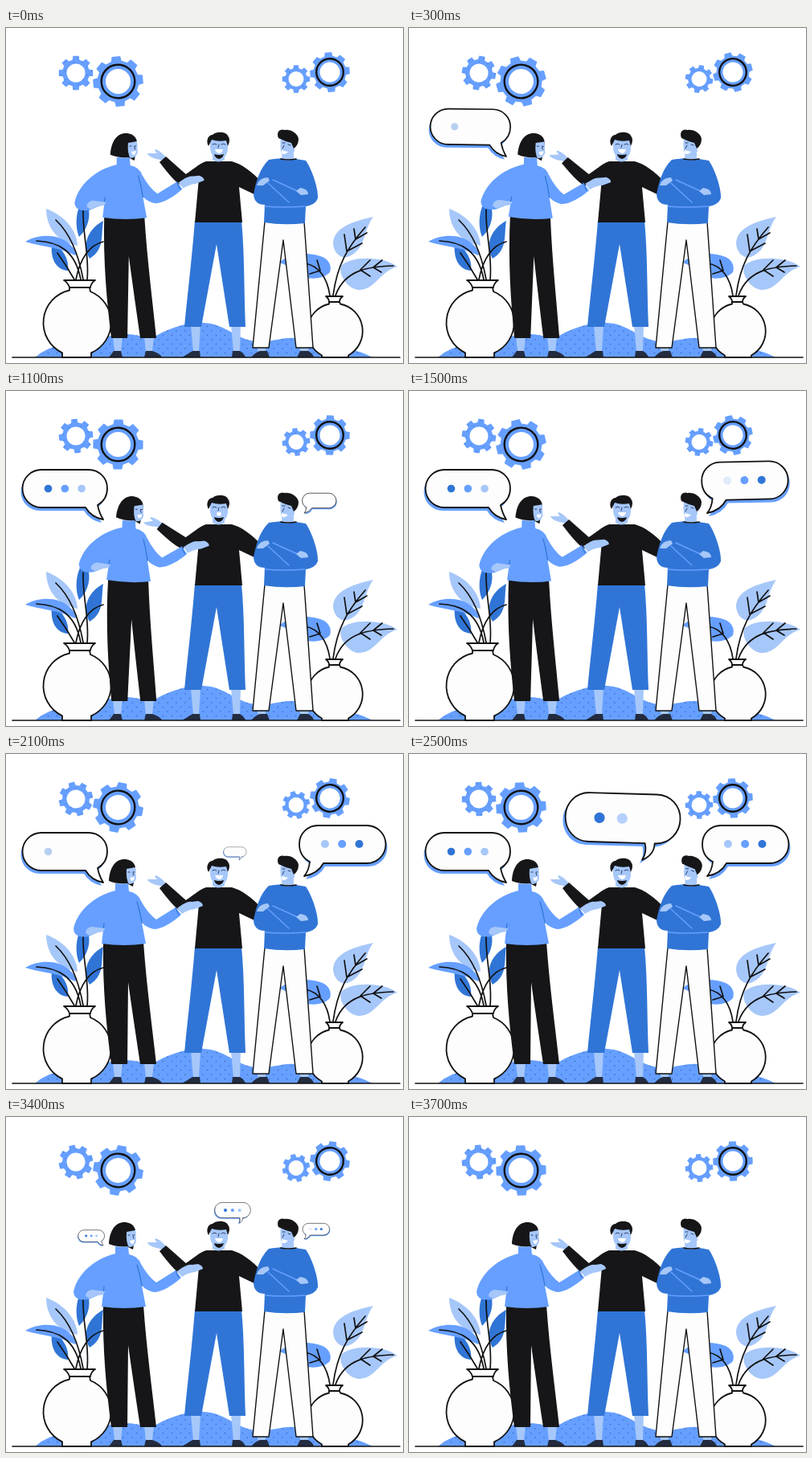
An HTML page for the animation above (3800 ms loop, 494 by 417 pixels).

```html
<!DOCTYPE html>
<html lang="en">
<head>
<meta charset="utf-8">
<title>Team talk</title>
<style>
html, body { margin: 0; width: 100%; height: 100%; overflow: hidden; background: #fff; }
svg { display: block; width: 100%; height: 100%; }
.mid { fill: #669fff; }
.deep { fill: #3075d6; }
.pale { fill: #a6c7f9; }
.ink { fill: #161618; }
.shoe { fill: #232c40; }
.white { fill: #fdfdfd; }
.line { fill: none; stroke: #111; stroke-width: 1.7; stroke-linecap: round; stroke-linejoin: round; }
.seam { fill: none; stroke: #3075d6; stroke-width: 1.2; stroke-linecap: round; }
.fold { fill: none; stroke: #669fff; stroke-width: 1.4; stroke-linecap: round; }
.edge { stroke: #111; stroke-width: 1.8; stroke-linejoin: round; }
.face { fill: none; stroke: #22345a; stroke-width: .9; stroke-linecap: round; }
</style>
</head>
<body>
<svg id="stage" viewBox="0 0 494 417" preserveAspectRatio="none">
  <defs>
    <pattern id="grain" width="11" height="11" patternUnits="userSpaceOnUse">
      <circle cx="3" cy="3" r=".75" fill="#2f62b5"/><circle cx="8.5" cy="8.5" r=".75" fill="#2f62b5"/>
    </pattern>
    <path id="hill" d="M36 410Q52 396 75 394C105 392 125 382 145 381C165 380 172 388 187 383C210 370 232 366 246 367C275 368 288 391 320 391C340 388 355 382 372 389C395 398 430 395 456 410Z"/>
  </defs>

  <use href="#hill" class="mid"/><use href="#hill" fill="url(#grain)"/>
  <g id="gears"></g>

  <!-- left plant -->
  <path class="pale" d="M50 225C50 244 60 266 89 271C88 251 72 233 50 225Z"/>
  <path class="deep" d="M57 269C70 272 79 288 77 302C62 301 55 287 57 269Z"/>
  <path class="mid" d="M24 266C42 255 66 257 78 268C86 275 89 281 86 283C64 272 46 273 24 266Z"/>
  <path class="deep" d="M97 212C107 224 106 246 91 260C85 246 87 224 97 212ZM121 240C118 258 123 276 104 287C94 270 102 250 121 240Z"/>
  <path class="line" d="M38 265C64 266 86 276 93 313M62 239C78 254 90 280 96 313M96 226C95 256 104 284 101 313M121 266C104 270 92 287 87 313M64 280Q76 297 85 313"/>
  <path class="white edge" d="M79 326.5A41.5 41.5 0 0 0 70 404.4V410H106V404.4A41.5 41.5 0 0 0 105 328L104 323H79Z"/>
  <path class="white edge" d="M72 314H111Q106 317 105 323H79Q77 317 72 314Z"/>

  <!-- right plant -->
  <path class="pale" d="M457 235C435 240 408 247 407 268C408 282 418 287 425 285C448 277 444 252 457 235Z"/>
  <path class="pale" d="M487 297C470 284 430 283 417 296C413 306 425 326 440 326C460 325 465 303 487 297Z"/>
  <path class="mid" d="M340 292C352 280 376 278 394 285C404 290 405 298 403 304C394 314 372 314 360 305C354 299 348 294 340 292Z"/>
  <path class="line" d="M447 248C425 273 412 295 407 333M421 257L424 278L443 268M433 250L435 263L449 255M482 296C455 297 422 299 410 333M453 289L441 301L453 309M468 289L457 298L467 304M372 293C390 296 400 312 403 333M387 289L391 302L378 306"/>
  <path class="white edge" d="M402 343.5A34.5 34.5 0 0 0 393 407.5V410H426V407.5A34.5 34.5 0 0 0 416 343.5L415 341H402Z"/>
  <path class="white edge" d="M398 334H419Q415 337 415 341H402Q402 337 398 334Z"/>

  <!-- middle man -->
  <g>
    <path class="pale" d="M230 370H242L240 403H233ZM280 370H292L291 403H283Z"/>
    <path class="shoe" d="M219 410Q226 406 232 402H241L242 410ZM282 402H291Q297 406 298 410H281Z"/>
    <path class="deep" d="M235 240H293C297 280 296 330 298 372H278L262 269L243 372H222C226 330 231 290 235 240Z"/>
    <g id="forearm">
      <path class="pale" d="M199 161C195 156 190 152 186 151Q184 152 188 156L176 156C177 160 185 163 192 164L196 167Z"/>
      <path class="ink" d="M191 167L199 160L225 183L219 196Q212 195 191 167Z"/>
    </g>
    <path class="ink" d="M249 166C240 169 232 177 222 183Q210 192 219 196C228 194 234 190 240 187L235 242H294L290 198L311 208L318 192C306 178 292 169 281 166Z"/>
    <path class="pale" d="M257 155H272V164Q264 169 257 164Z"/>
    <path class="pale" d="M254 139H276V151Q275 162 265 163Q255 161 254 150Z"/>
    <path class="ink" d="M252 147C248 140 252 133 257 133C262 128 274 129 276 134Q280 139 276 147L274 140Q264 142 256 139ZM259 157Q265 159 271 157Q270 162 265 163Q260 162 259 157Z"/>
    <path class="face" d="M257 145Q260 143 262 145M268 145Q271 143 273 145M265 145L264 149"/>
    <path id="smile" fill="#fff" d="M260 151H270Q269 156 265 156Q261 155 260 151Z"/>
    <ellipse id="talk" cx="265" cy="153" rx="2.8" ry="2.5" fill="#fff"/>
  </g>

  <!-- right man -->
  <g>
    <path class="pale" d="M312 395H324L322 404H314ZM364 395H377L376 404H367Z"/>
    <path class="shoe" d="M305 410Q310 404 316 402H325L328 410ZM362 410L366 402H376Q382 405 383 410Z"/>
    <path class="white" stroke="#111" stroke-width="1.4" stroke-linejoin="round" d="M322 241H371L382 398H361L345 264L327 398H307Z"/>
    <path class="deep" d="M327 164C342 161 360 162 373 165C382 178 389 202 388 212Q385 220 373 222L372 243Q345 246 321 242L322 220Q309 220 308 207C311 190 317 173 327 164Z"/>
    <path class="fold" d="M322 222Q345 224 372 222M326 193L352 217M332 189L365 204"/>
    <path class="pale" d="M312 196Q315 186 326 186L328 190L320 196ZM361 203L366 199Q376 200 376 207L367 208Z"/>
    <g id="head">
      <path class="pale" d="M344 152L358 156V163Q350 167 343 163Z"/>
      <path class="pale" d="M342 137L358 141L359 153Q355 163 346 161Q340 156 342 137Z"/>
      <path class="ink" d="M339 137C336 129 341 125 347 127C354 126 363 131 364 138Q364 146 358 150L355 143Q347 141 339 137Z"/>
      <path class="face" d="M344 143L347 143M351 145L354 146M346 146L344 150"/>
      <path fill="#fff" d="M343 152L351 154Q347 159 343 156Z"/>
    </g>
    <path class="line" d="M342 163Q351 165 361 163"/>
  </g>

  <!-- woman -->
  <path class="pale" d="M133 384H145L143 403H135ZM172 384H184L182 403H174Z"/>
  <path class="shoe" d="M128 410L134 402H143L145 410ZM172 410L174 402H182Q192 405 194 410Z"/>
  <path id="legs" class="ink" d="M121 234H171C175 290 182 340 187 386H167Q157 320 152 284L151 386H131C125 340 120 290 121 234Z"/>
  <g id="torso">
    <path class="pale" d="M213 192C220 187 226 183 231 184L239 183Q245 185 245 189L235 193Q226 194 219 199Z"/>
    <path class="pale" d="M138 153H152V168H138Z"/>
    <path class="ink" d="M128 158C129 140 137 130 149 131Q163 133 161 148L158 165L150 161Q138 162 128 158Z"/>
    <path class="pale" d="M150 143L161 141L162 155Q160 162 153 162Q149 156 150 143Z"/>
    <path class="face" d="M152 147H154M158 147H160M158 148L159 151"/>
    <path fill="#fff" d="M154 154L160 153Q160 158 156 158Z"/>
    <path class="mid" d="M136 161Q144 163 152 161L153 171Q164 173 168 183Q177 199 187 206L211 191L218 200C207 210 194 218 184 218Q175 216 169 210L174 236Q147 240 119 236L121 219L103 227Q85 230 84 218C88 197 108 177 136 170Z"/>
    <path class="seam" d="M163 184Q167 197 169 210M122 211L121 219M211 191L215 200"/>
    <path class="pale" d="M99 223Q99 217 106 215L123 217Q123 222 114 222L104 226Z"/>
  </g>

  <path class="line" stroke-width="2" d="M8 410H490"/>
  <g id="bubbles"></g>
</svg>
<script>
const LOOP = 3800, STEP = 100;
const $ = id => document.getElementById(id);
const clamp = x => Math.min(1, Math.max(0, x));
const ramp = (t, from, span) => clamp((t - from) / span);
const smooth = x => x * x * (3 - 2 * x);

function add(parent, tag, attrs) {
  const el = document.createElementNS('http://www.w3.org/2000/svg', tag);
  for (const key in attrs) el.setAttribute(key, attrs[key]);
  return parent.appendChild(el);
}

const circle = r => `M${r} 0A${r} ${r} 0 1 1 ${-r} 0A${r} ${r} 0 1 1 ${r} 0Z`;

function gearPath(outer, root, hole) {
  const points = [];
  for (let i = 0; i < 8; i++) {
    for (const [r, a] of [[root, -.25], [outer, -.17], [outer, .17], [root, .25]]) {
      const angle = i * Math.PI / 4 + a;
      points.push((r * Math.cos(angle)).toFixed(2) + ' ' + (r * Math.sin(angle)).toFixed(2));
    }
  }
  return 'M' + points.join('L') + 'Z' + circle(hole);
}

// meshing pairs turn in opposite directions
const gears = [
  { x: 87, y: 56, outer: 21.5, root: 17, hole: 11.5, dir: 1, start: 0 },
  { x: 139.5, y: 66.5, outer: 31.5, root: 26, hole: 15.5, ring: 20.8, dir: -1, start: -5 },
  { x: 361, y: 63.5, outer: 17.5, root: 13.8, hole: 9.5, dir: 1, start: 0 },
  { x: 403, y: 55, outer: 25, root: 20.5, hole: 12.5, ring: 16.8, dir: -1, start: -5 }
];
for (const g of gears) {
  g.el = add($('gears'), 'g', {});
  const d = gearPath(g.outer, g.root, g.hole);
  add(g.el, 'path', { d, class: 'mid', 'fill-rule': 'evenodd' });
  if (g.ring) add(g.el, 'circle', { r: g.ring, fill: 'none', stroke: '#111', 'stroke-width': 2.4 });
  else add(g.el, 'path', { d, fill: 'url(#grain)', 'fill-rule': 'evenodd', opacity: .6 });
}

// dots: [first x, spacing, y, radius]; fades: [time, appearing]
const bubbles = [
  { d: 'M44 98H103A23 23 0 0 1 126 121C126 131 121 138 114 142Q116 152 121 160Q106 157 99 145H44A23.5 23.5 0 0 1 44 98Z',
    tip: [121, 160], shade: [-2, 4], dots: [52.5, 20.8, 121.5, 4.8], start: 0, tilt: 1.2,
    fades: [[250, 1], [1500, 0], [2050, 1]] },
  { d: 'M388 89H449A23.5 23.5 0 0 1 449 136H395Q388 149 371 152Q377 145 378 134C370 130 365 122 365 112A23 23 0 0 1 388 89Z',
    tip: [371, 152], shade: [2, 4], dots: [439.5, -21.3, 112, 5], start: 950, tilt: -1.4,
    fades: [[1150, 1], [2600, 0], [3050, 1]] },
  { d: 'M223 50H306C324 50 336 64 336 80C336 96 324 111 306 111H305Q305 125 290 132Q296 122 293 111H223C205 111 193 97 193 80C193 64 205 50 223 50Z',
    tip: [290, 132], shade: [-3, 4], dots: [235.5, 28.3, 81, 6.6], start: 2000, tilt: 1.8,
    fades: [[2280, 1]] }
];
for (const b of bubbles) {
  b.el = add($('bubbles'), 'g', {});
  add(b.el, 'path', { d: b.d, class: 'mid', transform: `translate(${b.shade})` });
  add(b.el, 'path', { d: b.d, class: 'white edge' });
  const [x, gap, cy, r] = b.dots;
  b.spots = ['deep', 'mid', 'pale'].map((c, i) => add(b.el, 'circle', { cx: x + gap * i, cy, r, class: c }));
}

function dotAlpha(t, fades, i) {
  let alpha = 0;
  for (const [time, shown] of fades) {
    alpha += (shown - alpha) * ramp(t, time + 150 * i, 150);
  }
  return alpha;
}

function drawBubble(b, t) {
  const age = t - b.start;
  const size = smooth(ramp(age, 0, 350)) * (1 - smooth(ramp(t, 3180, 350)));
  const angle = b.tilt * Math.sin(Math.PI * ramp(age, 200, 500));
  const [x, y] = b.tip;
  b.el.setAttribute('display', size > .01 ? 'inline' : 'none');
  b.el.setAttribute('transform', `translate(${x} ${y}) rotate(${angle}) scale(${size}) translate(${-x} ${-y})`);
  b.spots.forEach((dot, i) => dot.setAttribute('opacity', dotAlpha(t, b.fades, i)));
}

function draw(t) {
  for (const g of gears) {
    const turn = g.start + g.dir * 135 * t / LOOP;
    g.el.setAttribute('transform', `translate(${g.x} ${g.y}) rotate(${turn})`);
  }
  const lean = 2.2 * smooth(ramp(t, -200, 700)) * (1 - smooth(ramp(t, 1150, 700)));
  $('legs').setAttribute('transform', `translate(0 392) skewX(${-lean}) translate(0 -392)`);
  $('torso').setAttribute('transform', `rotate(${lean} 150 392)`);

  const dip = smooth(ramp(t, 200, 400)) * (1 - smooth(ramp(t, 900, 450)));
  $('forearm').setAttribute('transform', `rotate(${-16 * dip} 220 190)`);
  $('talk').setAttribute('opacity', dip > .5 ? 1 : 0);
  $('smile').setAttribute('opacity', dip > .5 ? 0 : 1);

  const nod = Math.sin(Math.PI * ramp(t, 2200, 600));
  $('head').setAttribute('transform', `rotate(${2 * nod} 351 163)`);
  for (const b of bubbles) drawBubble(b, t);
}

const begin = performance.now();
function tick() {
  const t = (performance.now() - begin) % LOOP;
  draw(Math.floor(t / STEP) * STEP);
  requestAnimationFrame(tick);
}
tick();
</script>
</body>
</html>
```
